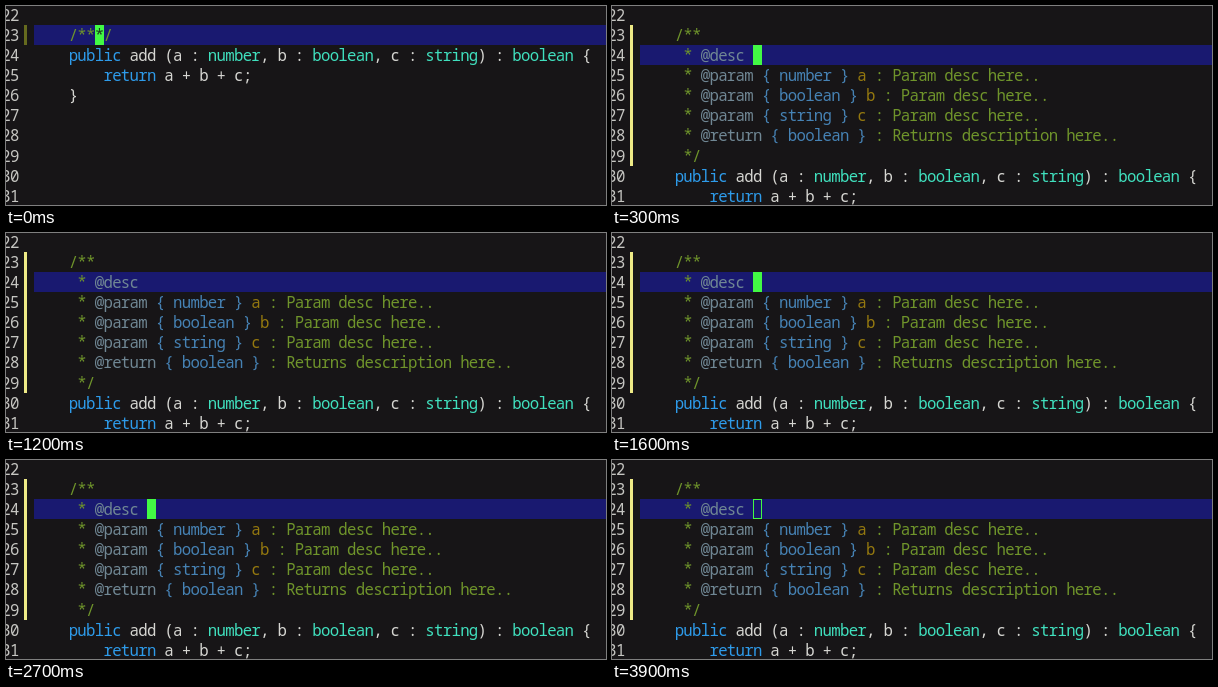
These frames come from a looping animation (600x199 px, 4 s). An HTML page with a canvas:

```html
<!DOCTYPE html>
<html lang="en">
<head>
<meta charset="utf-8">
<style>
html, body { margin: 0; width: 100%; height: 100%; overflow: hidden; background: #171517; }
canvas { display: block; }
</style>
</head>
<body>
<canvas id="stage" width="600" height="199"></canvas>
<script>
const ctx = document.getElementById('stage').getContext('2d');
const CELL = 8.7, ROW = 20.1, LEFT = 63, FIRST = 22, LOOP = 4000;
const GREEN = '#42f944', BACK = '#171517', CURRENT = '#191970';
const PLAIN = '#d6d6d2', WORD = '#2e9bea', TYPE = '#40e0be';
const NOTE = '#6f942b', TAG = '#708794', KIND = '#4682b4', NAME = '#94780f';

const rowTop = n => -1.2 + (n - FIRST) * ROW;
const colX = i => LEFT + i * CELL;

const code = [
  [[WORD, 'public'], [PLAIN, ' add (a : '], [TYPE, 'number'], [PLAIN, ', b : '],
   [TYPE, 'boolean'], [PLAIN, ', c : '], [TYPE, 'string'], [PLAIN, ') : '],
   [TYPE, 'boolean'], [PLAIN, ' {']],
  [[WORD, '    return'], [PLAIN, ' a + b + c;']],
  [[PLAIN, '}']]
];
const tagLine = (tag, type, name, text) =>
  [[NOTE, ' * '], [TAG, tag], [KIND, ` { ${type} } `], [NAME, name], [NOTE, text]];
const param = (type, name) => tagLine('@param', type, name, ' : Param desc here..');

const before = [[[NOTE, '/***/']], ...code];
const after = [
  [[NOTE, '/**']],
  [[NOTE, ' * '], [TAG, '@desc']],
  param('number', 'a'),
  param('boolean', 'b'),
  param('string', 'c'),
  tagLine('@return', 'boolean', '', ': Returns description here..'),
  [[NOTE, ' */']],
  ...code
];

function rect(x, y, w, h, color) {
  ctx.fillStyle = color;
  ctx.fillRect(x, Math.round(y), w, Math.round(y + h) - Math.round(y));
}

// One glyph per grid cell.
function write(text, x, row, color) {
  ctx.fillStyle = color;
  [...text].forEach((c, i) => ctx.fillText(c, x + (i + 0.5) * CELL, rowTop(row) + 16));
}

function writeLine(parts, row) {
  let col = 0;
  for (const [color, text] of parts) {
    write(text, colX(col), row, color);
    col += text.length;
  }
}

// Blink level in steps of a tenth of a second.
function blink(t) {
  const step = Math.floor(t / 100);
  if (step < 4) return 1;
  if (step === 28) return 0;
  return [0, 0, 0, 0.5, 1, 1, 1, 1, 0.5, 0][step % 10];
}

function draw(t) {
  const open = t >= 300;
  const row = open ? 24 : 23, col = open ? 9 : 3;
  const x = Math.round(colX(col)), y = rowTop(row);

  rect(0, 0, 600, 199, BACK);
  rect(28, y, 572, ROW, CURRENT);
  rect(18, rowTop(23), 3, ROW * (open ? 7 : 1), open ? '#eeea86' : '#656a1e');

  ctx.font = '15.7px "Noto Sans Mono", "DejaVu Sans Mono", monospace';
  ctx.textAlign = 'center';
  for (let n = FIRST; n < FIRST + 10; n++) write(String(n), -4.4, n, '#c6c6c2');
  (open ? after : before).forEach((line, i) => writeLine(line, 23 + i));

  if (t >= 3900) {
    ctx.strokeStyle = GREEN;
    ctx.lineWidth = 1;
    ctx.strokeRect(x + 0.5, Math.round(y) + 0.5, 8, 19);
  } else {
    ctx.globalAlpha = blink(t);
    rect(x, y, 9, ROW, GREEN);
    ctx.globalAlpha = 1;
    if (!open) write('*', colX(col), row, '#1c3a1c');
  }
}

function tick() {
  draw(performance.now() % LOOP);
  requestAnimationFrame(tick);
}
tick();
</script>
</body>
</html>
```
